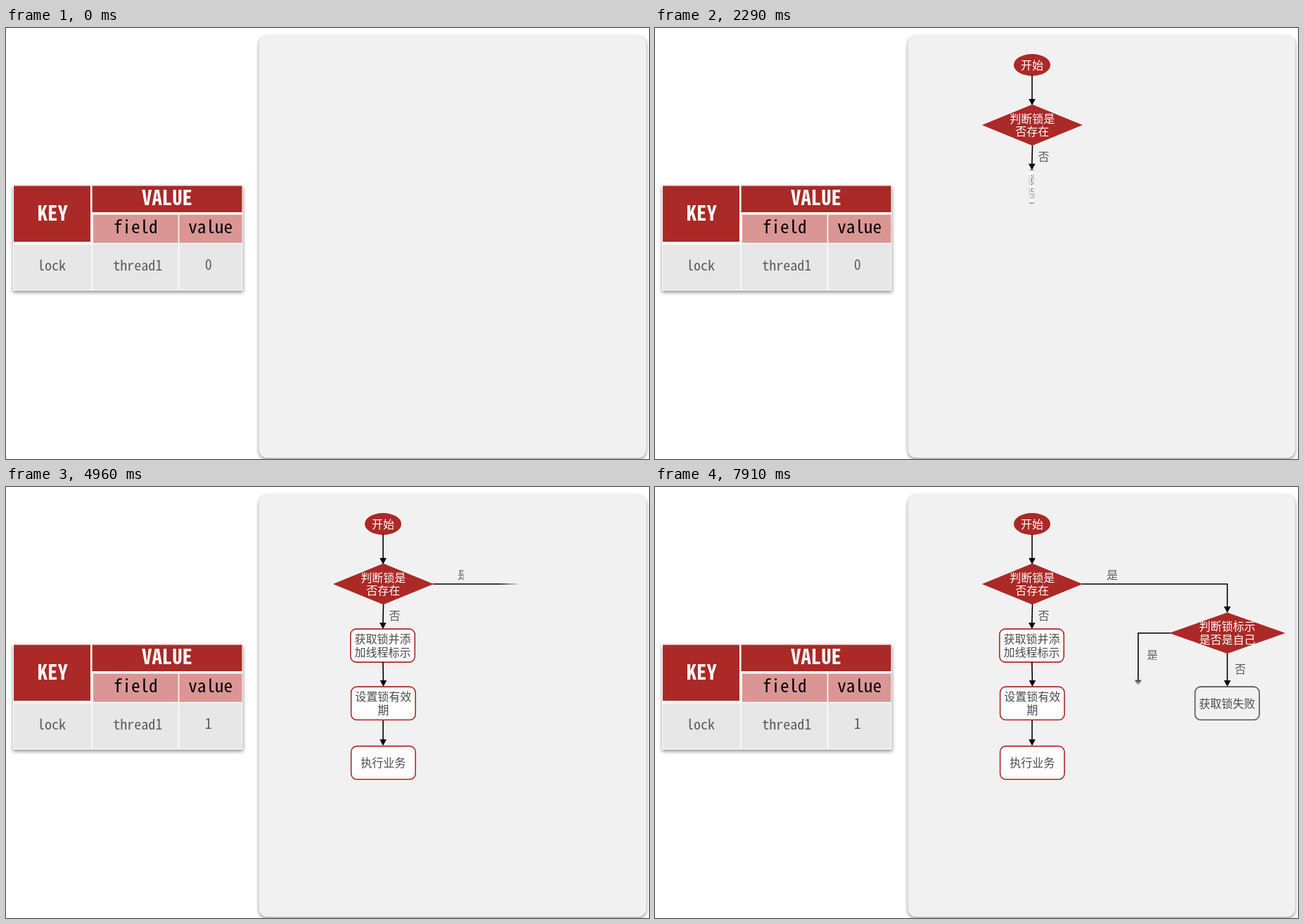
Recreate the animation shown at these times as an HTML page with a canvas. Size 914x613 px, loop 8 s.

```html
<!DOCTYPE html>
<html lang="zh">
<head>
<meta charset="utf-8">
<style>
  html, body { margin: 0; width: 100%; height: 100%; overflow: hidden; background: #fff; }
  canvas { display: block; }
</style>
</head>
<body>
<canvas id="stage" width="914" height="613"></canvas>
<script>
const LOOP = 8000, RED = '#ab2926', INK = '#4a4a4a', GREY = '#5c5c5c', PANEL = '#f1f1f1';
const SOFT = 0.14; // width of a reveal's feathered edge, relative to its length
const MONO = '"Noto Sans Mono CJK SC", "Noto Sans Mono", monospace';
const SANS = '"Noto Sans CJK SC", "Noto Sans CJK", sans-serif';

const stage = document.getElementById('stage');
const screen = stage.getContext('2d');
const layer = document.createElement('canvas');
layer.width = stage.width;
layer.height = stage.height;
const layerCtx = layer.getContext('2d');
let g = screen;

const clamp = v => Math.max(0, Math.min(1, v));

screen.font = `100px ${MONO}`;
const advancePerPx = screen.measureText('0').width / 100;

function text(str, x, y, color, font) {
  g.font = font;
  g.fillStyle = color;
  g.textAlign = 'center';
  g.fillText(str, x, y);
}

// Monospaced text, sized by the advance of one character
const mono = (str, x, y, advance, color, weight = 400) =>
  text(str, x, y, color, `${weight} ${advance / advancePerPx}px ${MONO}`);

// One or more lines of Chinese text centred on (x, y)
function han(str, x, y, color) {
  const lines = str.split('\n');
  lines.forEach((line, i) =>
    text(line, x, y + 6 + (i - (lines.length - 1) / 2) * 18.8, color, `16px ${SANS}`));
}

function rect(x0, y0, x1, y1, color) {
  g.fillStyle = color;
  g.fillRect(x0, y0, x1 - x0, y1 - y0);
}

function polygon(points, color) {
  g.beginPath();
  points.forEach(([x, y]) => g.lineTo(x, y));
  g.fillStyle = color;
  g.fill();
}

function withShadow(draw) {
  g.save();
  g.shadowColor = 'rgba(0,0,0,.45)';
  g.shadowBlur = 5;
  g.shadowOffsetY = 2;
  draw();
  g.restore();
}

// Polyline ending in a downward arrowhead
function arrow(...points) {
  const [x, y] = points[points.length - 1];
  g.beginPath();
  points.slice(0, -1).forEach(p => g.lineTo(...p));
  g.lineTo(x, y - 7);
  g.strokeStyle = '#000';
  g.lineWidth = 1.6;
  g.stroke();
  polygon([[x - 4.8, y - 9], [x + 4.8, y - 9], [x, y]], '#000');
}

function diamond(x, y, rx, ry, label) {
  polygon([[x - rx, y], [x, y - ry], [x + rx, y], [x, y + ry]], RED);
  han(label, x, y, '#fff');
}

function box(x, y, label, stroke = RED, fill = '#fff') {
  g.beginPath();
  g.roundRect(x - 45.7, y - 23.6, 91.4, 47.2, 8);
  g.fillStyle = fill;
  g.fill();
  g.strokeStyle = stroke;
  g.lineWidth = 1.6;
  g.stroke();
  han(label, x, y, INK);
}

function wipeMask(p, from, to, vertical) {
  const soft = (to - from) * SOFT;
  const front = from + p * (to - from + soft);
  const mask = vertical
    ? g.createLinearGradient(0, front - soft, 0, front)
    : g.createLinearGradient(front - soft, 0, front, 0);
  mask.addColorStop(0, '#000');
  mask.addColorStop(1, 'transparent');
  return mask;
}

function splitMask(p, from, to) {
  const mid = (from + to) / 2, half = (to - from) / 2, soft = half * SOFT;
  const front = p * (half + soft);
  const edge = Math.min(0.5, soft / (2 * front));
  const core = `rgba(0,0,0,${Math.min(1, front / soft)})`;
  const mask = g.createLinearGradient(mid - front, 0, mid + front, 0);
  mask.addColorStop(0, 'transparent');
  mask.addColorStop(edge, core);
  mask.addColorStop(1 - edge, core);
  mask.addColorStop(1, 'transparent');
  return mask;
}

const down = (from, to) => p => wipeMask(p, from, to, true);
const right = (from, to) => p => wipeMask(p, from, to, false);
const split = (from, to) => p => splitMask(p, from, to);

// Each step: start, end, mask, drawing
const steps = [
  [460, 940, split(510, 562), () => {
    g.beginPath();
    g.ellipse(536, 52.5, 26, 15.5, 0, 0, 7);
    g.fillStyle = RED;
    g.fill();
    han('开始', 536, 52.5, '#fff');
  }],
  [940, 1390, down(67, 110), () => arrow([536, 67], [536, 110])],
  [1390, 1820, split(465, 608), () => diamond(536.3, 138, 71.5, 29.3, '判断锁是\n否存在')],
  [1810, 2250, down(167, 202), () => arrow([536.5, 167], [535.8, 202])],
  [1810, 2250, down(174, 191), () => han('否', 552.5, 183, GREY)],
  [2250, 2690, split(489, 582), () => box(535.5, 225.5, '获取锁并添\n加线程标示')],
  [4030, 4210, down(249, 284), () => arrow([535.8, 249], [536.4, 284])],
  [4200, 4380, split(490, 583), () => box(536.3, 307.7, '设置锁有效\n期')],
  [4370, 4550, down(332, 368), () => arrow([536, 332], [536, 368])],
  [4540, 4720, split(490, 583), () => box(536.3, 392.2, '执行业务')],
  [4715, 5195, right(608, 818), () => arrow([607, 138], [813.5, 138], [813.5, 179])],
  [4715, 5195, right(642, 658), () => han('是', 650, 125, GREY)],
  [5190, 5640, split(731, 896), () => diamond(813.5, 207.8, 82.5, 29.3, '判断锁标示\n是否是自己')],
  [5975, 6440, down(237, 284), () => arrow([813.5, 237], [813.5, 284])],
  [5975, 6440, down(250, 268), () => han('否', 832, 259, GREY)],
  [6440, 6920, split(767, 860), () => box(813.3, 307.7, '获取锁失败', '#555', PANEL)],
  [7520, 7970, down(207, 283.5), () => arrow([733, 207.7], [686.8, 207.7], [686.8, 283.5])],
  [7520, 7970, down(230, 247), () => han('是', 707, 239, GREY)],
];

function reveal(t, [start, end, mask, draw]) {
  const p = clamp((t - start) / (end - start));
  if (p === 0) return;
  if (p === 1) return draw();
  g = layerCtx;
  g.clearRect(0, 0, layer.width, layer.height);
  draw();
  g.globalCompositeOperation = 'destination-in';
  g.fillStyle = mask(p);
  g.fillRect(0, 0, layer.width, layer.height);
  g.globalCompositeOperation = 'source-over';
  g = screen;
  g.drawImage(layer, 0, 0);
}

function table() {
  withShadow(() => rect(10, 224, 336.5, 373.5, '#fff'));
  rect(11, 224.5, 120, 304, RED);
  rect(122.6, 224.5, 335.5, 262, RED);
  rect(124, 265.5, 244.7, 305.7, '#da9694');
  rect(246.3, 265.5, 335.5, 305.7, '#da9694');
  [[11, 121.2], [122.6, 244.7], [246.3, 335.5]].forEach(([x0, x1], i) =>
    rect(x0, i ? 307.2 : 308, x1, 372.2, '#e7e7e7'));
  mono('KEY', 66.3, 273.5, 14.4, '#fff', 700);
  mono('VALUE', 229, 252, 14.4, '#fff', 700);
  mono('field', 184.2, 292, 12.6, '#000');
  mono('value', 290.7, 292, 12.6, '#000');
  mono('lock', 65, 345.3, 10, GREY);
  mono('thread1', 187.2, 345.3, 10, GREY);
}

function digit(str, offset, alpha) {
  g.globalAlpha = alpha;
  mono(str, 287.7, 344.3 + offset, 10, GREY);
  g.globalAlpha = 1;
}

function render(t) {
  rect(0, 0, 914, 613, '#fff');
  withShadow(() => {
    g.beginPath();
    g.roundRect(359.5, 11, 550.5, 600.5, 12);
    g.fillStyle = PANEL;
    g.fill();
  });
  table();
  const leave = clamp((t - 2650) / 660), enter = clamp((t - 2650) / 880);
  digit('0', -67 * leave, 1 - leave);
  digit('1', 67 * (1 - enter), enter);
  steps.forEach(step => reveal(t, step));
}

function tick() {
  render(performance.now() % LOOP);
  requestAnimationFrame(tick);
}
tick();
</script>
</body>
</html>
```
